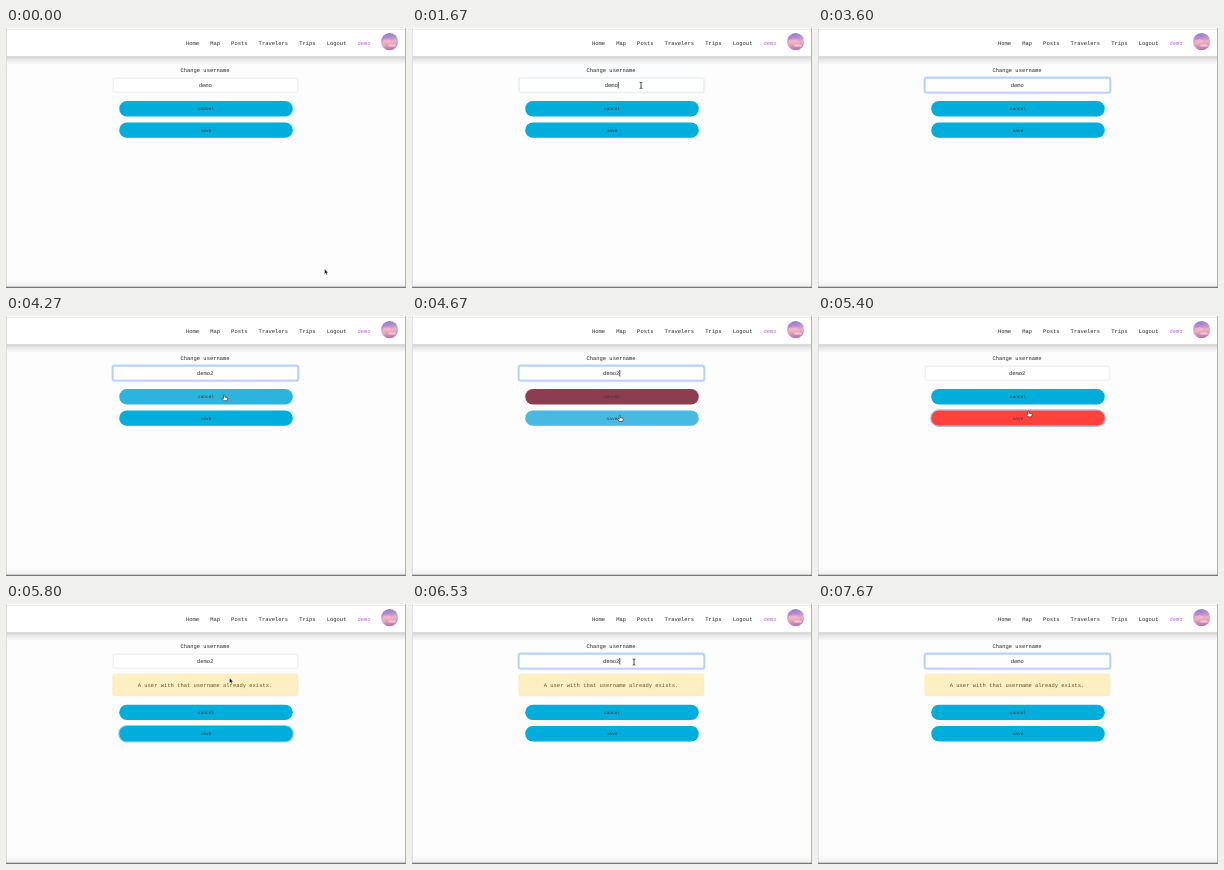
Animation, 400 px wide and 260 px high, one loop 8000 ms. Source, as an HTML page:

```html
<!DOCTYPE html>
<html lang="en">
<head>
<meta charset="utf-8">
<title>Change username</title>
<style>
  html, body { margin: 0; width: 100%; height: 100%; overflow: hidden; background: #fdfdfd; }
  svg { display: block; width: 100vw; height: 100vh; }
  text { font: 5.48px "Liberation Mono", monospace; fill: #262626; text-rendering: geometricPrecision; white-space: pre; }
  .mid { text-anchor: middle; }
  .btn text { font-size: 4.45px; fill: #3b3338; }
</style>
</head>
<body>
<svg viewBox="0 0 400 260">
  <defs>
    <linearGradient id="shade" x2="0" y2="1">
      <stop offset="0" stop-color="#cdcdcd"/>
      <stop offset=".4" stop-color="#e8e8e8"/>
      <stop offset="1" stop-color="#fdfdfd"/>
    </linearGradient>
    <linearGradient id="foot" x2="0" y2="1">
      <stop offset="0" stop-color="#fdfdfd"/>
      <stop offset="1" stop-color="#efefef"/>
    </linearGradient>
    <linearGradient id="sky" x2=".15" y2="1">
      <stop offset="0" stop-color="#8478c4"/>
      <stop offset=".35" stop-color="#b78fd0"/>
      <stop offset=".6" stop-color="#f2b0c4"/>
      <stop offset="1" stop-color="#b878b0"/>
    </linearGradient>
  </defs>

  <rect width="400" height="260" fill="#fdfdfd"/>
  <rect y="251" width="400" height="8" fill="url(#foot)"/>
  <rect y="28" width="400" height="9" fill="url(#shade)"/>
  <rect width="400" height="28.2" fill="#fff"/>
  <rect y="1" width="400" height="1" fill="#e6e6e6"/>
  <rect width=".8" height="260" fill="#d8d8d8"/>
  <rect x="399" width="1" height="260" fill="#b4b4b4"/>
  <rect y="258.7" width="400" height="1.3" fill="#787878"/>
  <g id="nav"></g>
  <circle cx="383.6" cy="13.6" r="8.6" fill="url(#sky)"/>
  <ellipse cx="381" cy="13" rx="4.5" ry="1.4" fill="#f4b8d0" opacity=".8"/>
  <ellipse cx="386" cy="17.5" rx="4" ry="1.2" fill="#fbd3d4" opacity=".8"/>

  <text class="mid" x="199" y="44.1">Change username</text>
  <rect id="halo" x="106.4" y="49.4" width="186.2" height="15.6" rx="2.4" fill="none" stroke="#bdd7fb" stroke-width="1.6"/>
  <rect id="field" x="107.2" y="50.2" width="184.6" height="14" rx="1.6" fill="#fff" stroke-width=".6"/>
  <text id="value" class="mid" x="199.2" y="59"></text>
  <rect id="caret" y="54" width=".8" height="6.4" fill="#222"/>

  <g id="alert">
    <rect x="106.8" y="70" width="185" height="21.7" rx="1.7" fill="#fcf0c3" stroke="#f5e4ac" stroke-width=".5"/>
    <text class="mid" x="199" y="83" style="fill:#66531b">A user with that username already exists.</text>
  </g>

  <g id="buttons">
    <g class="btn">
      <rect id="cancel" x="113.2" y="73.1" width="173.6" height="15.3" rx="7.65"/>
      <text class="mid" x="200" y="82.2">cancel</text>
    </g>
    <g class="btn">
      <rect id="ring" x="112.7" y="94" width="174.6" height="16.3" rx="8.15" fill="none" stroke="#a3c6e6" stroke-width="1.3"/>
      <rect id="save" x="113.2" y="94.5" width="173.6" height="15.3" rx="7.65"/>
      <text class="mid" x="200" y="103.6">save</text>
    </g>
  </g>

  <g id="pointer">
    <path id="arrow" d="M0 0V5.2L1.2 4.1L2 6L2.9 5.6L2.1 3.8H3.7Z" fill="#000" stroke="#fff" stroke-width=".4"/>
    <path id="beam" d="M-1.4-3.1Q0-3.1 0-2.3Q0-3.1 1.4-3.1M0-2.3V2.3M-1.4 3.1Q0 3.1 0 2.3Q0 3.1 1.4 3.1" fill="none" stroke="#222" stroke-width=".8"/>
    <path id="hand" d="M-.6 .2Q0-.5 .6 .2V2.3L2.9 2.8Q3.6 3 3.4 4L2.9 6H-.4L-2.2 3.8Q-2 2.9-1.2 3.4L-.6 3.9Z" fill="#fff" stroke="#222" stroke-width=".6"/>
  </g>
</svg>
<script>
const LOOP = 8000, STEP = 200 / 3, BLINK = 502, USER = "demo";
const ADVANCE = 5.48 * 0.6;

// Moments of the interaction, in ms.
const FOCUS = 1650, HIDE = 3595, TYPE = 3660, WAKE = 3860, CROSS = 4607,
      SUBMIT = 4740, REJECT = 5460, REFOCUS = 6330, ERASE = 7660;

const $ = id => document.getElementById(id);
const set = (el, attrs) => { for (const k in attrs) el.setAttribute(k, attrs[k]); };
const show = (el, on) => set(el, { visibility: on ? "visible" : "hidden" });
const between = (v, a, b) => v >= a && v < b;
const clamp = v => Math.min(1, Math.max(0, v));
const smooth = p => p * p * (3 - 2 * p);

// Fades in after `on` and out again after `off`.
const pulse = (t, on, off, fade) => clamp((t - on) / fade) - clamp((t - off) / fade);
const hover = (t, on, off) => pulse(t, on, off, 180);
const focus = (t, on, off) => pulse(t, on, off, 150);

// Colour at p along evenly spaced stops.
function ramp(stops, p) {
  const i = Math.min(stops.length - 2, Math.floor(p * (stops.length - 1)));
  const f = p * (stops.length - 1) - i;
  return `rgb(${stops[i].map((v, n) => Math.round(v + (stops[i + 1][n] - v) * f))})`;
}
const buttonTint = [[0, 173, 219], [72, 185, 224], [139, 62, 80], [255, 67, 60]];
const borderTint = [[221, 221, 221], [138, 180, 243]];

// Pointer glides: start, end, x, y.
const glides = [
  [60, 530, 244, 57], [1060, 1530, 229, 57.4], [WAKE, 4667, 207.8, 99.5],
  [5250, 5800, 223.5, 74], [5800, 6200, 224, 58], [6460, 7070, 174, 59.3]
];
function pointerAt(t) {
  let x = 318.5, y = 241;
  for (const [from, to, gx, gy] of glides) {
    const p = smooth(clamp((t - from) / (to - from)));
    x += (gx - x) * p;
    y += (gy - y) * p;
  }
  return [x, y];
}

function caretOn(t) {
  const spans = [[FOCUS, HIDE], [TYPE, SUBMIT], [REFOCUS + 120, ERASE]];
  return spans.some(([a, b]) => between(t, a, b) && (t - a) % (2 * BLINK) < BLINK);
}

let navX = 180;
for (const label of ["Home", "Map", "Posts", "Travelers", "Trips", "Logout", USER]) {
  const el = document.createElementNS("http://www.w3.org/2000/svg", "text");
  set(el, { x: navX, y: 17.4 });
  el.textContent = label;
  if (label === USER) el.style.fill = "#b565d3";
  $("nav").append(el);
  navX += label.length * ADVANCE + 11.05;
}

function drawPointer(t, shift) {
  const [x, y] = pointerAt(t), by = y - shift;
  const onButton = between(x, 113, 287) && (between(by, 73, 88.5) || between(by, 93.5, 110));
  const inField = between(x, 107, 292) && between(y, 50, 64.5);
  const kind = inField ? "beam" : onButton ? "hand" : "arrow";
  const hidden = between(t, HIDE, WAKE) || t >= ERASE;
  set($("pointer"), { transform: `translate(${x} ${y})` });
  for (const id of ["arrow", "beam", "hand"]) show($(id), !hidden && id === kind);
}

function draw(t) {
  const rejected = t >= REJECT, shift = rejected ? 27.6 : 0;
  const text = between(t, TYPE, ERASE) ? USER + "2" : USER;
  const fieldFocus = focus(t, FOCUS, SUBMIT) + focus(t, REFOCUS, LOOP);

  $("value").textContent = text;
  set($("halo"), { opacity: fieldFocus });
  set($("field"), { stroke: ramp(borderTint, fieldFocus) });
  set($("caret"), { x: 199.2 + text.length * ADVANCE / 2 });
  show($("caret"), caretOn(t));

  show($("alert"), rejected);
  set($("buttons"), { transform: `translate(0 ${shift})` });
  set($("cancel"), { fill: ramp(buttonTint, hover(t, 405, 440) + hover(t, 4230, CROSS)) });
  set($("save"), { fill: ramp(buttonTint, hover(t, 365, 400) + hover(t, CROSS, REJECT)) });
  set($("ring"), { opacity: focus(t, SUBMIT, REFOCUS) });
  drawPointer(t, shift);
}

let start;
function tick(now) {
  start ??= now;
  const t = (now - start) % LOOP;
  draw(Math.floor((t + 4) / STEP) * STEP);
  requestAnimationFrame(tick);
}
draw(0);
requestAnimationFrame(tick);
</script>
</body>
</html>
```
